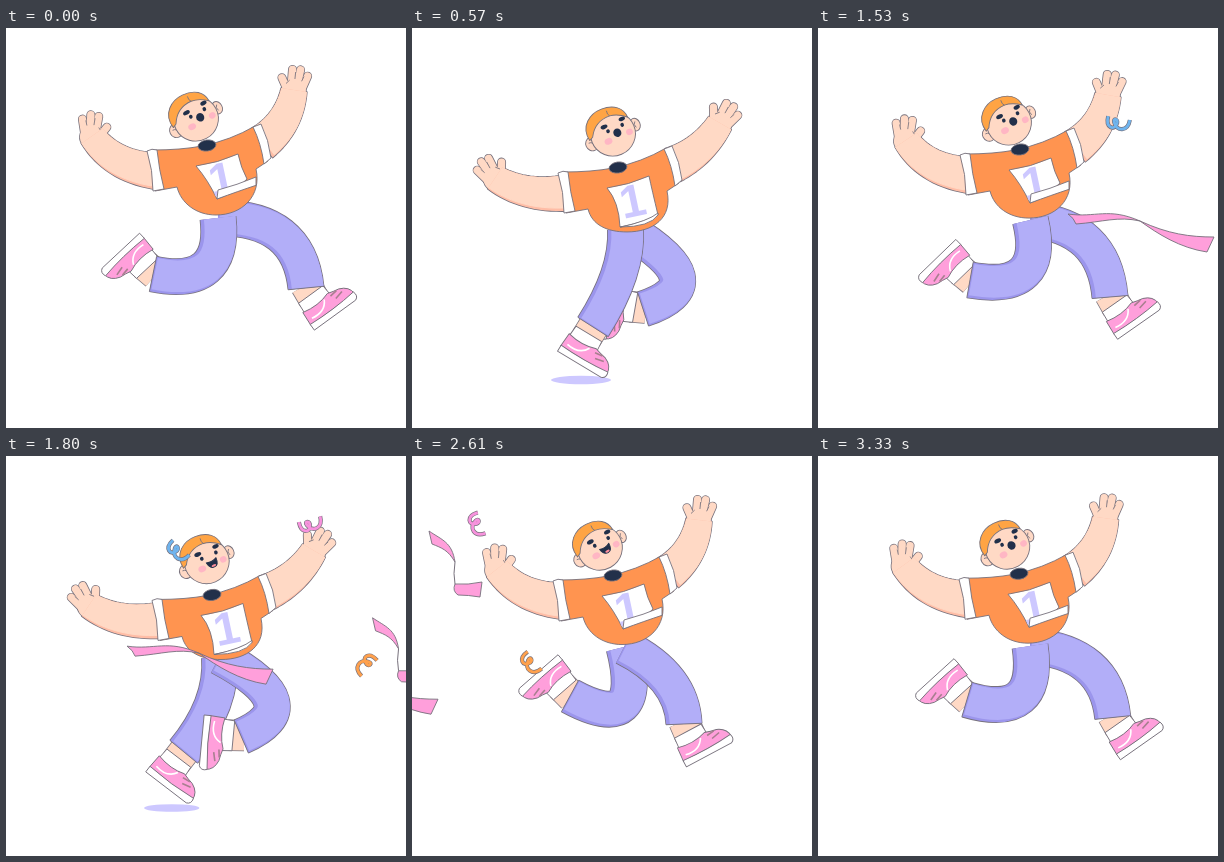
Write an HTML page with a canvas that moves like this. It is 400x400 px and loops after 3360 ms.

```html
<!DOCTYPE html>
<html lang="en">
<head>
<meta charset="utf-8">
<title>Runner</title>
<style>
html, body { margin: 0; width: 100%; height: 100%; overflow: hidden; background: #fff; }
canvas { display: block; width: 400px; height: 400px; }
</style>
</head>
<body>
<canvas id="stage"></canvas>
<script>
const LOOP = 3360, STEP = 30;
const LINE = '#77717c', SKIN = '#ffd9c5', SKIN_SHADE = '#ffbda6', ORANGE = '#ff9450',
  HAIR = '#ffa444', PANTS = '#b2aef8', PANTS_SHADE = '#9b95ec', PINK = '#ff9fdb',
  NAVY = '#22304a', LILAC = '#cdc8ff';

const canvas = document.getElementById('stage');
const ratio = window.devicePixelRatio || 1;
canvas.width = canvas.height = 400 * ratio;
const g = canvas.getContext('2d');
g.lineJoin = 'round';

// One stride: phase, torso dx dy, head x y turn, left hand x y turn, right hand x y turn, bib curl, shadow
const BODY = [
  [0, 0, 0, 190, 91, -28, 86, 108, -85, 288, 62, -80, 1, 0],
  [.1, 1, 4, 191, 95, -27, 88, 112, -86, 290, 67, -78, 1, 0],
  [.3, 4, 16, 198, 104, -25, 84, 132, -105, 300, 82, -68, .5, .8],
  [.46, 5, 22, 201, 106, -23, 83, 150, -122, 308, 95, -58, 0, 1],
  [.6, 5, 13, 197, 100, -26, 83, 135, -112, 307, 87, -62, .1, 0],
  [.76, 4, 7, 194, 99, -28, 91, 108, -88, 293, 70, -78, .8, 0],
  [.86, 0, 2, 188, 92, -29, 85, 113, -88, 287, 64, -80, 1, 0]
];
// Knee x y, ankle x y, foot turn for the landing leg, then for the swinging leg
const LEGS = [
  [293, 189, 300, 260, -36, 220, 261, 147, 246, 137],
  [286, 198, 292, 269, -35, 230, 266, 152, 252, 136],
  [252, 232, 238, 308, 0, 262, 285, 178, 262, 115],
  [216, 244, 181, 299, 31, 308, 256, 231, 281, 100],
  [234, 273, 168, 270, 76, 285, 219, 250, 274, 57],
  [236, 277, 162, 249, 124, 276, 210, 265, 270, 2],
  [235, 282, 158, 240, 139, 270, 220, 272, 268, -28]
];

// Smooth monotone curve through rows of [x, values...], repeating every period
function spline(rows, period, lift = 0) {
  const n = rows.length;
  const at = (i, c) => {
    const turn = Math.floor(i / n);
    return rows[i - turn * n][c] + turn * (c ? lift : period);
  };
  const rate = (i, c) => (at(i + 1, c) - at(i, c)) / (at(i + 1, 0) - at(i, 0));
  const slope = (i, c) => {
    const a = rate(i - 1, c), b = rate(i, c);
    return a * b > 0 ? 2 * a * b / (a + b) : 0;
  };
  return (x, c = 1) => {
    let i = -1;
    while (at(i + 1, 0) <= x) i++;
    const w = at(i + 1, 0) - at(i, 0), u = (x - at(i, 0)) / w, v = 1 - u;
    return at(i, c) * v * v * (1 + 2 * u) + at(i + 1, c) * u * u * (3 - 2 * u)
      + w * u * v * (v * slope(i, c) - u * slope(i + 1, c));
  };
}

const cycle = [];
for (const half of [0, 1]) {
  BODY.forEach((row, i) => {
    if (half && i === 1) return;
    const lead = LEGS[i].slice(0, 5), swing = LEGS[i].slice(5);
    let key = [row[0] + half, ...row.slice(1), ...(half ? [...lead, ...swing] : [...swing, ...lead])];
    // the second leap reaches less far
    if (half && i === 0) {
      const last = cycle[cycle.length - 1];
      key = key.map((v, c) => c < 14 ? v : last[c] + (v - last[c]) * .2);
    }
    cycle.push(key);
  });
}
const pose = spline(cycle, 2);
const stride = spline([[0, 0], [570, 1.46], [960, 2.6], [1530, 4.1], [2130, 4.76], [2610, 4.86], [3225, 5.84]], LOOP, 6);
const drift = spline([[900, 400], [1530, 0], [2130, -254], [2610, -370], [3200, -760]], LOOP, -1200);

const rad = deg => deg * Math.PI / 180;
const mix = (a, b, u) => a + (b - a) * u;

function paint(path, fill, line = LINE, width = .9) {
  if (fill) { g.fillStyle = fill; g.fill(path); }
  if (line) { g.strokeStyle = line; g.lineWidth = width; g.stroke(path); }
}
const shape = (d, fill, line, width) => paint(new Path2D(d), fill, line, width);
function oval(x, y, rx, ry, fill, line = null, turn = 0) {
  const p = new Path2D();
  p.ellipse(x, y, rx, ry, turn, 0, 7);
  paint(p, fill, line);
}
function placed(x, y, turn, draw, flip = 1) {
  g.save();
  g.translate(x, y);
  g.rotate(rad(turn));
  g.scale(flip, 1);
  draw();
  g.restore();
}

function foot(x, y, turn) {
  placed(x, y, turn, () => {
    shape('M-15 8L15 8L16 22L-16 22Z', '#fff');
    shape('M-17 18Q0 22 14 17Q20 19 26 20Q36 24 36 33L-18 33Z', PINK);
    shape('M-13 28Q2 31 8 20', null, '#fff', 1.6);
    shape('M15 21L23 20M18 26L27 24', null, '#a87f8f', 1.6);
    shape('M-18 32Q10 34 36 31Q38 37 33 39L-18 39Z', '#fff');
  });
}

function leg(hx, hy, [kx, ky, ax, ay, turn]) {
  const a = rad(turn), shin = Math.atan2(ay - ky, ax - kx);
  const ankle = new Path2D(`M${ax - 3 * Math.cos(shin)} ${ay - 3 * Math.sin(shin)}L${ax - 13 * Math.sin(a)} ${ay + 13 * Math.cos(a)}`);
  paint(ankle, null, LINE, 31.5);
  paint(ankle, null, SKIN, 30);
  foot(ax, ay, turn);
  const tube = new Path2D(`M${hx} ${hy}Q${kx} ${ky} ${ax} ${ay}`);
  paint(tube, null, LINE, 37);
  paint(tube, null, PANTS_SHADE, 35.4);
  g.save();
  g.translate(1.7, -.4);
  paint(tube, null, PANTS, 31.8);
  g.restore();
  const nx = 18 * Math.sin(shin), ny = -18 * Math.cos(shin);
  shape(`M${ax - nx} ${ay - ny}L${ax + nx} ${ay + ny}`);
}

function hand(x, y, turn, flip) {
  const tips = [[-14, -10], [-5, -20], [3, -21], [11, -16]];
  placed(x, y, turn + 90, () => {
    g.lineCap = 'round';
    for (const [color, grow] of [[LINE, .8], [SKIN, 0]]) {
      tips.forEach(([tx, ty], i) => {
        shape(`M${i ? tx * .6 : -6} 2L${tx} ${ty}`, null, color, 7.4 + grow * 2);
      });
      oval(0, 1, 12 + grow, 12 + grow, color);
    }
    g.lineCap = 'butt';
    shape('M-1 -11L-1.5 -18M6 -10L7.5 -15M-9 -5L-6 -9', null, LINE, .8);
  }, flip);
}

function arm(sx, sy, kx, ky, x, y, turn, flip) {
  const left = [], right = [];
  for (let i = 0; i <= 16; i++) {
    const u = i / 16, v = 1 - u;
    const px = v * v * sx + 2 * u * v * kx + u * u * x;
    const py = v * v * sy + 2 * u * v * ky + u * u * y;
    const a = Math.atan2(v * (ky - sy) + u * (y - ky), v * (kx - sx) + u * (x - kx));
    const w = mix(18, 13, u);
    left.push(`${px - w * Math.sin(a)} ${py + w * Math.cos(a)}`);
    right.unshift(`${px + w * Math.sin(a)} ${py - w * Math.cos(a)}`);
  }
  const tube = new Path2D('M' + left.concat(right).join('L') + 'Z');
  paint(tube, null, LINE, 1.6);
  hand(x, y, turn, flip);
  paint(tube, SKIN_SHADE, null);
  g.save();
  g.clip(tube);
  g.translate(flip * 1.6, -3);
  paint(tube, SKIN, SKIN, 1);
  g.restore();
}

function bib(curl) {
  const lx = mix(203, 211, curl), ly = mix(177, 171, curl), rx = 241, ry = mix(165, 151, curl);
  const sheet = new Path2D(`M190 138Q212 135 232 126Q235 140 ${rx} ${ry}Q225 ${ly - 4} ${lx} ${ly}Q202 152 190 138Z`);
  paint(sheet, '#fff');
  g.save();
  g.clip(sheet);
  placed(216, 154, -12, () => {
    g.font = 'bold 46px "Liberation Sans", Arial, sans-serif';
    g.textAlign = 'center';
    g.textBaseline = 'middle';
    g.fillStyle = LILAC;
    g.fillText('1', 0, 0);
  });
  g.restore();
  const e = 9 * curl;
  shape(`M${lx} ${ly}L${lx + 1} ${ly - e}Q${rx - 10} ${ry + 6} ${rx + e} ${ry - 2}L${rx + e} ${ry + e * .7}Q${rx - 8} ${ry + 12} ${lx} ${ly}Z`, '#fff');
}

function shirt(dx, dy, curl) {
  const low = 187 - .23 * dy;
  g.save();
  g.translate(dx, dy);
  shape(`M146 122Q175 122 196 118Q225 112 249 98L262 133L250 141C256 168 236 ${low} 210 ${low}C190 ${low} 175 175 171 159L149 163Z`, ORANGE);
  shape('M141 123Q146 120 151 122Q153 142 158 161L147 163Q147 142 141 123Z', '#fff');
  shape('M247 99L255 96Q263 112 265 130L258 136Q255 115 247 99Z', '#fff');
  oval(201, 117.5, 9, 5.5, NAVY, LINE, -.15);
  bib(curl);
  g.restore();
}

function head(x, y, turn, smiling) {
  placed(x, y, turn, () => {
    oval(-23, 1, 6.5, 7, SKIN, LINE);
    oval(24, 0, 5, 6.5, SKIN, LINE);
    shape('M-26 -1Q-21 -1 -22 4M25 -3Q22 -1 24 3', null, LINE, .8);
    oval(0, 0, 22.5, 22, SKIN, LINE);
    shape('M-24 -3C-27 -20 -13 -28 -1 -27.5C12 -27 20 -20 20 -10Q12 -17 4 -18Q-12 -19 -20 -5Z', HAIR);
    shape('M4 -18Q2 -20 3 -24', null, LINE, .8);
    oval(-7, 5, 4, 3.2, '#ffb6c4');
    oval(16, 4.5, 3.4, 3.2, '#ffb6c4');
    oval(-5.5, -10, 3.6, 2.1, NAVY);
    oval(14, -10.5, 3.3, 2.1, NAVY);
    oval(-3.5, -4.5, 1.8, 2, NAVY);
    oval(12, -4.8, 1.8, 2, NAVY);
    if (smiling) {
      shape('M-1 1Q5 3 10 0Q10 8 5 8Q0 8 -1 1Z', NAVY, NAVY);
      oval(5, 6.4, 2.4, 1.1, '#ff8f9c');
    } else {
      oval(4.5, .5, 4, 4.3, NAVY);
    }
  });
}

function longRibbon(x) {
  placed(x, x * x * .00025, 0, () => {
    shape('M250 186C278 190 290 179 322 193C300 188 285 194 258 196Q256 190 250 186Z', PINK);
    shape('M322 193C350 206 372 209 396 209L389 224C362 220 340 206 322 193Z', PINK);
  });
}

function shortRibbon(x, y) {
  placed(x, y, 0, () => {
    shape('M-27 -33C-14 -24 -4 -22 -1 -2C-8 -14 -14 -16 -24 -20Z', PINK);
    shape('M-1 -2Q-3 10 -1 20', null, LINE, 1);
    shape('M-1 20Q12 21 26 18L24 33Q12 31 2 31Q-4 27 -1 20Z', PINK);
  });
}

function curl(x, y, turn, color) {
  placed(x, y, turn, () => {
    const d = 'M6 -11C-6 -12 -8 -2 1 -1C5 -1 5 -6 1 -4C-8 0 -6 11 6 11';
    shape(d, null, LINE, 4.2);
    shape(d, null, color, 2.8);
  });
}

function draw(t) {
  const step = stride(t), s = step % 2, x = drift(t);
  const p = cycle[0].map((_, c) => c ? pose(s, c) : s);
  const [, dx, dy, hx, hy, hr, lx, ly, la, rx, ry, ra, fold, shade] = p;
  const near = p.slice(14, 19), far = p.slice(19);

  g.setTransform(ratio, 0, 0, ratio, 0, 0);
  g.fillStyle = '#fff';
  g.fillRect(0, 0, 400, 400);

  if (shade > .02) oval((s < 1 ? far : near)[2] - 12, 352, 30 * shade, 4.2 * shade, LILAC);
  shortRibbon(44 + 1.45 * (x + 370), 108 + .36 * (x + 370));

  const px = 212 + .3 * dx, py = 190 + .5 * dy;
  leg(px, py, far);
  leg(px, py, near);

  const ax = 149 + dx, ay = 143 + dy, bx = 256 + dx, by = 115 + dy;
  arm(ax, ay, ax - 42, ay + 11 + .45 * (ly - ay), lx, ly, la, -1);
  arm(bx, by, bx + 20 + .22 * (rx - bx), by + 11 + .58 * (ry - by), rx, ry, ra, 1);
  shirt(dx, dy, fold);
  head(hx, hy, hr, t >= 1800 && t < 2900);

  longRibbon(x);
  curl(300 + x, 96, -80 - x * .25, '#6fb4ee');
  curl(434 + x, 69, -150 - x * .35, '#f792dd');
  curl(488 + x, 208, 90 + x * .35, '#ffa14d');
}

function tick(now) {
  draw(Math.floor((now % LOOP) / STEP) * STEP);
  requestAnimationFrame(tick);
}
draw(0);
requestAnimationFrame(tick);
</script>
</body>
</html>
```
